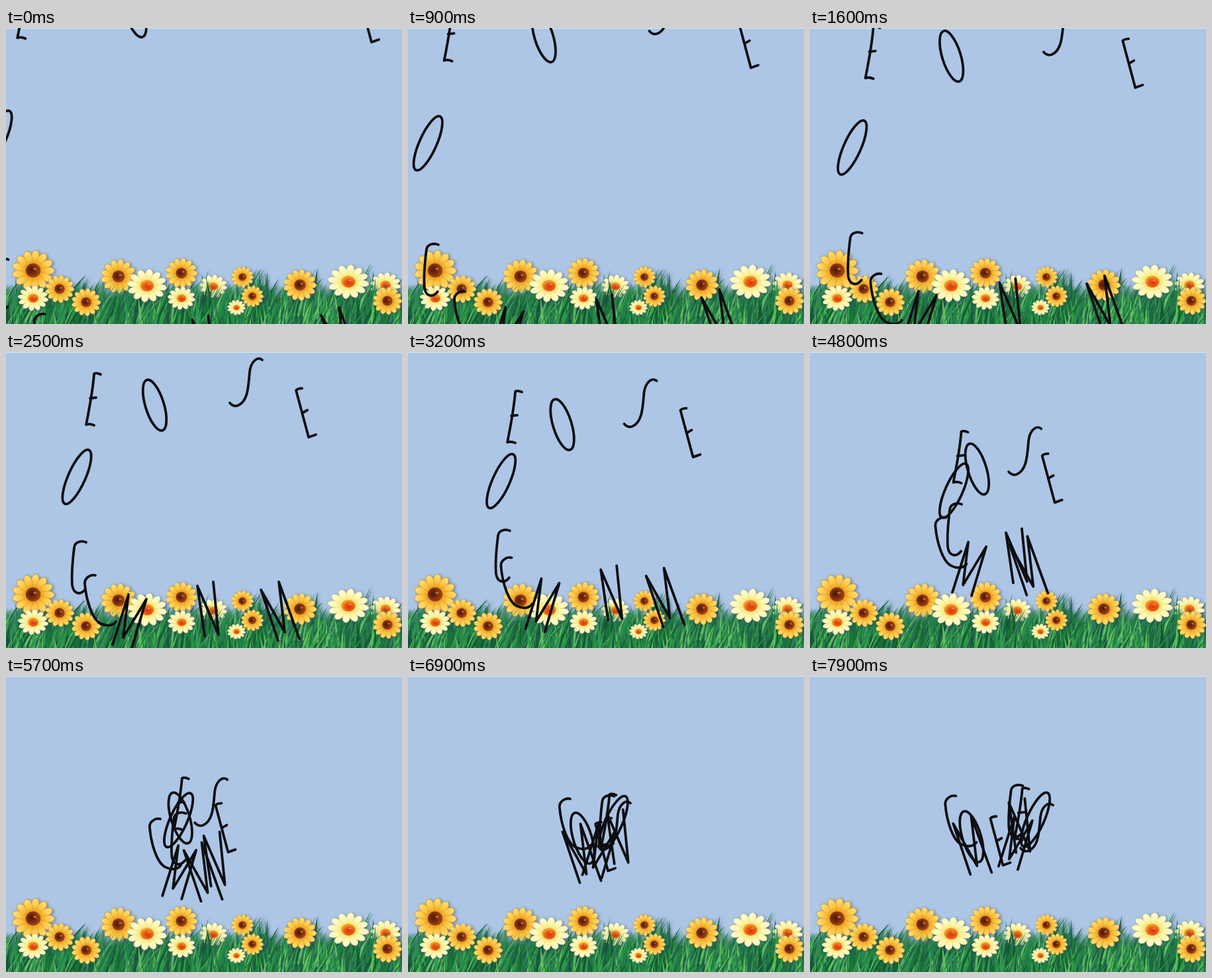
An HTML page that plays this animation: 598 px wide and 448 px high, repeating every 8000 ms.

```html
<!DOCTYPE html>
<html lang="es">
<head>
<meta charset="utf-8">
<title>Letters over a meadow</title>
<style>
html, body { margin: 0; width: 100%; height: 100%; overflow: hidden; background: #adc6e5; }
svg { position: absolute; left: 0; top: 0; width: 598px; height: 448px; }
#letters { fill: none; stroke: #0d0e12; stroke-width: 3.8; stroke-linecap: round; stroke-linejoin: round; }
.shade { filter: drop-shadow(2px 1px 2px rgba(45, 65, 95, .5)); }
</style>
</head>
<body>
<svg id="meadow" viewBox="0 0 598 448">
  <defs>
    <radialGradient id="gold" gradientUnits="userSpaceOnUse" cx="0" cy="0" r="1">
      <stop offset=".3" stop-color="#ea951c"/><stop offset=".58" stop-color="#fbc440"/><stop offset="1" stop-color="#ffe27a"/>
    </radialGradient>
    <radialGradient id="cream" gradientUnits="userSpaceOnUse" cx="0" cy="0" r="1">
      <stop offset=".25" stop-color="#f6df62"/><stop offset=".6" stop-color="#fdf7ae"/><stop offset="1" stop-color="#fffdd8"/>
    </radialGradient>
    <radialGradient id="goldEye" cx=".4" cy=".45">
      <stop offset="0" stop-color="#4f1a06"/><stop offset=".5" stop-color="#6f270b"/><stop offset="1" stop-color="#9a4312"/>
    </radialGradient>
    <radialGradient id="creamEye" cx=".55" cy=".6">
      <stop offset="0" stop-color="#dc330c"/><stop offset=".6" stop-color="#e75a16"/><stop offset="1" stop-color="#f29a2a"/>
    </radialGradient>
    <linearGradient id="soil" x2="0" y2="1">
      <stop offset="0" stop-color="#2b8a50" stop-opacity="0"/><stop offset=".4" stop-color="#227a42"/><stop offset="1" stop-color="#1b6c38"/>
    </linearGradient>
  </defs>
  <rect width="598" height="448" fill="#adc6e5"/>
  <rect width="598" height="1" fill="#dfe8f3"/>
</svg>
<svg id="letters" viewBox="0 0 598 448"></svg>
<script>
const NS = 'http://www.w3.org/2000/svg';
const meadow = document.getElementById('meadow');
const sheet = document.getElementById('letters');

function add(parent, tag, attrs) {
  const el = document.createElementNS(NS, tag);
  for (const key in attrs) el.setAttribute(key, attrs[key]);
  return parent.appendChild(el);
}

let seed = 7;
function random(min, max) {
  seed = (seed * 16807) % 2147483647;
  return min + (max - min) * seed / 2147483647;
}

// Tufts rise at an even spacing along the meadow.
const tuft = x => Math.max(0, Math.cos((x - 45) / 85 * 2 * Math.PI)) ** 4;

function blade(parent, tipX, tipY, height, lean, width, fill) {
  const x = tipX - lean, y = tipY + height;
  const midX = x + lean * .3, midY = y - height * .55;
  add(parent, 'path', {
    fill,
    d: `M${x - width} ${y}Q${midX - width} ${midY} ${tipX} ${tipY}Q${midX + width} ${midY} ${x + width} ${y}Z`
  });
}

function grass(count, top, bottom, rise, colors) {
  const group = add(meadow, 'g', { class: 'shade' });
  for (let i = 0; i < count; i++) {
    const x = random(-10, 625);
    const y = top + (bottom - top) * i / count - rise * tuft(x) * random(.3, 1);
    const fill = colors[Math.floor(random(0, colors.length))];
    blade(group, x, y, random(38, 68), random(-8, 34), random(1, 2.4), fill);
  }
}

function flower(kind, x, y, r) {
  const isGold = kind === 'gold', count = isGold ? 13 : 12;
  const head = add(add(meadow, 'g', { class: 'shade' }), 'g', {
    transform: `translate(${x} ${y}) scale(${r} ${r * (isGold ? .96 : .83)})`
  });
  for (let i = 0; i < count; i++) {
    add(head, 'path', {
      d: 'M0 0C-.13 -.35 -.26 -.78 -.11 -.93Q0 -1.07 .11 -.93C.26 -.78 .13 -.35 0 0Z',
      fill: `url(#${kind})`,
      stroke: isGold ? '#dc9a26' : '#ebdf8e',
      'stroke-width': .025,
      transform: `rotate(${i * 360 / count + 8})`
    });
  }
  add(head, 'circle', { r: .35, fill: `url(#${kind}Eye)` });
  add(head, 'ellipse', { cx: .09, cy: -.08, rx: .08, ry: .06, fill: '#ffb070', opacity: .5 });
}

add(meadow, 'rect', { y: 388, width: 598, height: 60, fill: 'url(#soil)' });
grass(330, 374, 410, 26, ['#1c6f45', '#2a8650', '#37995a', '#145c38', '#2f8f4c']);
flower('gold', 357, 377, 17);
flower('cream', 313, 391, 21);
flower('cream', 573, 389, 23);
flower('gold', 170, 376, 27);
grass(520, 384, 440, 16, ['#23854a', '#2f9a49', '#1a7038', '#125a30', '#37a052', '#1f7f3d', '#62bd62']);

flower('gold', 41, 367, 32);
flower('cream', 41, 409, 23);
flower('gold', 81, 395, 22);
flower('gold', 121, 415, 22);
flower('cream', 213, 390, 30);
flower('gold', 265, 371, 24);
flower('cream', 265, 409, 21);
flower('cream', 348, 423, 14);
flower('gold', 372, 406, 17);
flower('gold', 444, 389, 25);
flower('cream', 517, 384, 31);
flower('gold', 576, 413, 22);

function oval(cx, cy, rx, ry, turn) {
  const a = turn * Math.PI / 180, dx = ry * Math.sin(a), dy = ry * Math.cos(a);
  const arc = `A${rx} ${ry} ${turn} 0 1 `;
  return `M${cx + dx} ${cy - dy}${arc}${cx - dx} ${cy + dy}${arc}${cx + dx} ${cy - dy}Z`;
}

// In word order: each outline as it lies at REST, with its drift in px per second.
const letters = [
  ['M135 338C128 336 118 342 119 351C121 375 130 405 143 411C153 416 162 414 166 408', 30.6, -38],
  [oval(224.5, 80.5, 14, 40, -17), 12.1, 42],
  ['M411 437L385 360L421 424L412 348L443 434', -36.4, -30],
  ['M447 55Q441 55 438 58L457 129L468 125M448 92L455 88', -38, 43],
  ['M300 430L289 354L321 428L313 348', 3, -35],
  ['M121 288C114 285 104 287 103 296C100 320 99 340 100 353C102 366 112 369 120 359', 47, -25],
  ['M143 34Q137 31 133 33Q131 60 121 110Q127 108 133 111M127 70L136 69', 41.5, 38],
  ['M161 443L185 367L177 432L212 374L190 448', 23.5, -34.5],
  [oval(107, 189, 13, 44.5, 24), 48, 9.1],
  ['M387 12C381 6 370 13 368 30C366 50 366 75 350 81C345 83 340 80 338 77', -16.5, 45.3]
].map(([d, vx, vy]) => ({ el: add(sheet, 'path', { d }), vx, vy }));

const LOOP = 8, STEP = .1, REST = 2.5;
const TURN = 5.7, BLEND = 1.76;

// From TURN on, the velocity blends evenly from the drift to a fan that spreads the word in an arch.
function draw(time) {
  const t = Math.floor(time % LOOP / STEP + 1e-6) * STEP;
  const u = Math.min(1, Math.max(0, (t - TURN) / BLEND));
  const fanTime = BLEND * u * u / 2 + Math.max(0, t - TURN - BLEND);
  const driftTime = t - REST - fanTime;
  letters.forEach(({ el, vx, vy }, i) => {
    const fanX = 7.3 * (i - 4.1), fanY = -1 - .7 * i * (9 - i);
    const x = vx * driftTime + fanX * fanTime;
    const y = vy * driftTime + fanY * fanTime;
    el.setAttribute('transform', `translate(${x.toFixed(2)} ${y.toFixed(2)})`);
  });
}

const start = performance.now();
function tick() {
  draw((performance.now() - start) / 1000);
  requestAnimationFrame(tick);
}
tick();
</script>
</body>
</html>
```
